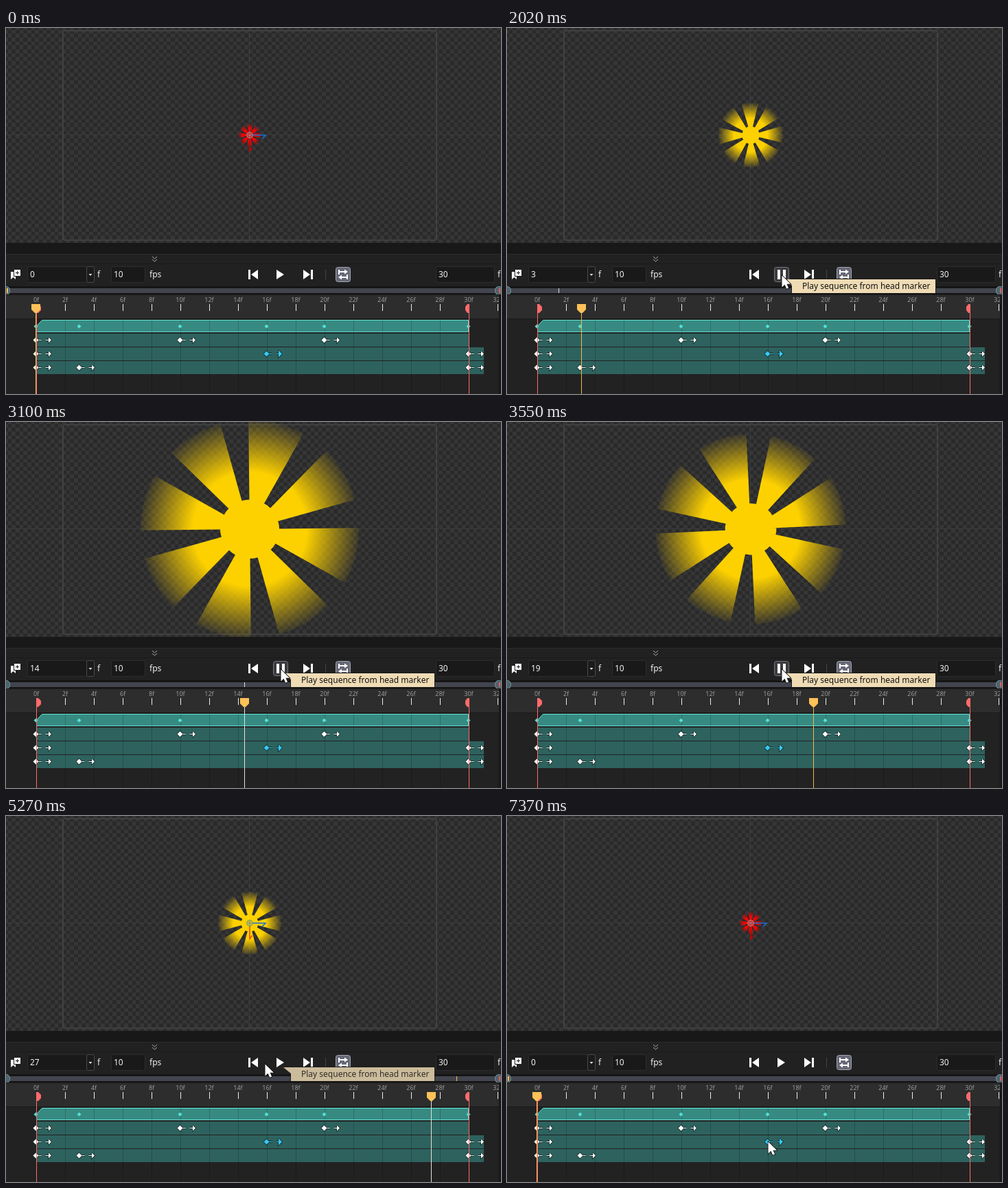
These frames come from a looping animation (721 by 533 pixels, 8000 ms). An HTML page with a canvas:

```html
<!DOCTYPE html>
<html>
<head>
<meta charset="utf-8">
<title>Timeline playback</title>
<style>
html, body { margin: 0; width: 100%; height: 100%; overflow: hidden; background: #222; }
canvas { display: block; }
</style>
</head>
<body>
<canvas id="stage" width="721" height="533"></canvas>
<script>
const c = document.getElementById('stage').getContext('2d');
const LOOP = 8000, PLAY = 1750, STOP = 4900, JUMP = 5910, STEP = 90;
const STOP_AT = 27.4;
const FONT = '"Noto Sans", sans-serif';
const BUTTONS = { back: 349, play: 389 };

const lerp = (a, b, u) => a + (b - a) * u;
const clamp = u => Math.max(0, Math.min(1, u));
const snap = (t, from) => from + STEP * Math.floor((t - from) / STEP);
const frameX = f => 44 + 21 * f;

function rect(x, y, w, h, fill) {
  c.fillStyle = fill;
  c.fillRect(x, y, w, h);
}
function box(x, y, w, h, fill, stroke, r = 2) {
  c.beginPath();
  c.roundRect(x + .5, y + .5, w - 1, h - 1, r);
  c.fillStyle = fill;
  c.fill();
  c.strokeStyle = stroke;
  c.lineWidth = 1;
  c.stroke();
}
function trace(points) {
  c.beginPath();
  points.forEach(([x, y], i) => i ? c.lineTo(x, y) : c.moveTo(x, y));
}
function poly(points, fill) {
  trace(points);
  c.closePath();
  c.fillStyle = fill;
  c.fill();
}
function line(points, stroke, width = 1) {
  trace(points);
  c.strokeStyle = stroke;
  c.lineWidth = width;
  c.stroke();
}
function text(s, x, y, size, fill, align = 'left') {
  c.font = size + 'px ' + FONT;
  c.textAlign = align;
  c.fillStyle = fill;
  c.fillText(s, x, y);
}
const diamond = (x, y, r) => [[x - r, y], [x, y - r], [x + r, y], [x, y + r]];

// Transparency grid, aligned with the corner of the scene frame.
const checker = (() => {
  const view = document.createElement('canvas');
  view.width = 721;
  view.height = 313;
  const g = view.getContext('2d');
  const edge = i => Math.round(2.8 + i * 5.65);
  g.fillStyle = '#363636';
  g.fillRect(0, 0, 721, 313);
  g.fillStyle = '#2a2a2a';
  for (let i = -1; edge(i) < 721; i++)
    for (let j = -1; edge(j) < 313; j++)
      if ((i + j) % 2 === 0) g.fillRect(edge(i), edge(j), edge(i + 1) - edge(i), edge(j + 1) - edge(j));
  return view;
})();

// Playback bounces back at the last frame.
function headAt(t) {
  if (t < PLAY || t >= JUMP) return 0;
  if (t >= STOP) return STOP_AT;
  const f = 3.05 + (snap(t, PLAY) - 2020) * .010546;
  return f > 30 ? 60 - f : f;
}

function cursorAt(t) {
  if (t < 750) return null;
  if (t < 5180) {
    const u = clamp((snap(t, 750) - 750) / 630), e = 1 - (1 - u) ** 2;
    return [lerp(316, 400, e), lerp(516, 360, e)];
  }
  if (t < 6470) {
    const k = Math.min(3, Math.floor((t - 5180) / STEP));
    return [[392, 377, 366, 360][k], 361];
  }
  if (t < 7280) {
    const u = clamp((snap(t, 6470) - 6380) / 810), v = 1 - u;
    return [v * v * 360 + 2 * u * v * 535 + u * u * 381,
            v * v * 361 + 2 * u * v * 420 + u * u * 476];
  }
  return [t < 7370 ? 381 : 380, 474];
}

function drawSun(f) {
  const size = f < 16 ? lerp(17, 174.5, f / 16) : lerp(174.5, 16.5, (f - 16) / 14);
  const turn = f < 10 ? 14.3 * f : f < 20 ? lerp(143, 360, (f - 10) / 10) : 0;
  const mix = clamp(f / 3), rad = Math.PI / 180;
  const tint = a => `rgba(${lerp(255, 253, mix)},${Math.round(209 * mix)},0,${a})`;
  const g = c.createRadialGradient(0, 0, 0, 0, 0, size);
  g.addColorStop(0, tint(1));
  g.addColorStop(.52, tint(1));
  g.addColorStop(1, tint(.06));
  c.save();
  c.translate(355, 156);
  c.rotate(turn * rad);
  c.beginPath();
  for (let i = 0; i < 8; i++) {
    c.moveTo(0, 0);
    c.arc(0, 0, size, (i * 45 - 15) * rad, (i * 45 + 15) * rad);
    c.closePath();
  }
  c.moveTo(size * .27, 0);
  c.arc(0, 0, size * .27, 0, 7);
  c.fillStyle = g;
  c.fill();
  c.restore();
}

function drawGizmo(f) {
  line([[359, 156], [378, 156], [373, 161]], '#1a6fd0', 1.6);
  line([[355, 160], [355, 179], [358.5, 174]], f ? '#f04a10' : '#d00000', 1.6);
  c.beginPath();
  c.arc(355, 156, 4.3, 0, 7);
  c.fillStyle = 'rgba(120,140,150,.35)';
  c.fill();
  c.strokeStyle = f ? '#5b9a78' : '#b09090';
  c.lineWidth = 1;
  c.stroke();
  line([[352.5, 156], [357.5, 156]], '#888');
  line([[355, 153.5], [355, 158.5]], '#888');
}

function drawView(f, playing) {
  c.save();
  c.beginPath();
  c.rect(0, 0, 721, 313);
  c.clip();
  c.drawImage(checker, 0, 0);
  rect(0, 155, 721, 1, 'rgba(85,85,85,.3)');
  rect(354, 0, 1, 313, 'rgba(65,80,100,.4)');
  c.beginPath();
  c.roundRect(83, 4, 544, 305, 2);
  c.strokeStyle = '#464646';
  c.lineWidth = 1.6;
  c.stroke();
  drawSun(f);
  if (!playing) drawGizmo(f);
  c.restore();
}

function drawTransport(f, playing, hover, pressed) {
  rect(0, 313, 721, 16, '#181818');
  rect(0, 329, 721, 47, '#212121');
  rect(0, 329, 721, 1, '#2c2c2c');
  rect(0, 343, 721, 1, '#1a1a1a');
  for (const y of [333, 337]) line([[213, y], [216.5, y + 3], [220, y]], '#aaa');

  const white = '#fff';
  rect(12, 352, 9, 9, white);
  rect(16, 354, 1, 5, '#222');
  rect(14, 356, 5, 1, '#222');
  poly([[7, 355], [11, 355], [11, 362], [14, 362], [14, 366], [10.5, 363], [7, 366]], white);

  box(31, 347, 87, 24, '#191919', '#2d2d2d');
  box(117, 347, 12, 24, '#1b1b1b', '#4a4a4a');
  poly([[120.5, 358], [125.5, 358], [123, 361]], '#ddd');
  box(153, 347, 50, 24, '#191919', '#2d2d2d');
  box(626, 347, 86, 24, '#191919', '#2d2d2d');
  [[Math.floor(f), 35], ['f', 133], ['10', 157], ['fps', 209], ['30', 630], ['f', 716]]
    .forEach(([s, x]) => text(s, x, 363, 12, '#f0f0f0'));

  if (hover) box(BUTTONS[hover], 348, 22, 22, pressed ? '#55555f' : '#3a3a3f', '#77777f', 3);
  rect(353, 352, 3, 14, white);
  poly([[367, 352], [367, 366], [357, 359]], white);
  if (playing) {
    rect(394, 352, 4, 14, white);
    rect(402, 352, 4, 14, white);
  } else poly([[394, 352], [405, 359], [394, 366]], white);
  poly([[433, 352], [443, 359], [433, 366]], white);
  rect(444, 352, 3, 14, white);
  rect(465, 352, 1, 14, '#444');

  box(480, 348, 22, 22, '#666876', '#a3a5b2', 3);
  rect(484, 352, 2, 7, white);
  rect(486, 354, 8, 2, white);
  poly([[493, 351.5], [498, 355], [493, 358.5]], white);
  rect(496, 359, 2, 7, white);
  rect(488, 362, 8, 2, white);
  poly([[489, 359.5], [484, 363], [489, 366.5]], white);
}

function drawScroll(f, playing) {
  rect(0, 376, 721, 12, '#151515');
  box(0, 378, 719, 9, '#42454e', '#151515', 3);
  box(-5, 376, 11, 13, '#4c646d', '#78929b', 5);
  box(712, 376, 12, 13, '#4c646d', '#78929b', 5);
  rect(718, 379, 2, 7, '#e85c5c');
  rect(Math.round(2 + 23.87 * f) - (f ? 0 : 1), 379, f ? 1 : 2, 7, playing ? '#ddd' : '#f6bd50');
}

// Shapes sit on a dark outline.
function drawKey(f, y, lit) {
  const x = frameX(f) - .5, ink = lit ? '#35c8f4' : '#fff', dark = '#142c2a';
  const r = lit ? 5 : 4, tip = x + 22.5;
  const head = [[tip - r, y - r], [tip, y], [tip - r, y + r]];
  const stem = [[x + 14, y], [tip - 3, y]], tail = [[x + 4, y], [x + 8, y]];
  for (const shape of [head, diamond(x, y, 4)]) line([...shape, shape[0]], dark, 1.6);
  line(stem, dark, 3);
  line(tail, dark, 3);
  poly(head, ink);
  poly(diamond(x, y, 4), ink);
  line(stem, ink, 1);
  line(tail, ink, 1);
}

function drawTracks() {
  rect(0, 388, 721, 35, '#2d2d2d');
  rect(0, 388, 721, 1, '#1b1b1b');
  rect(0, 423, 721, 110, '#222');
  rect(0, 423, 721, 1, '#191919');
  for (let i = 0; i <= 32; i += 2) {
    text(i + 'f', frameX(i), 399, 9, '#9a9a9a', 'center');
    rect(frameX(i), 402, 1, 10, '#eee');
  }

  rect(44, 445, 630, 19, '#2e625e');
  rect(44, 465, 652, 19, '#2e625e');
  rect(44, 485, 652, 19, '#2e625e');
  const bar = [[44.5, 442.5], [44.5, 434], [52.5, 425.5], [673.5, 425.5], [673.5, 442.5]];
  poly(bar, '#378a82');
  for (let i = 2; i <= 32; i += 2) rect(frameX(i), 424, 1, 109, 'rgba(0,0,0,.2)');
  line([...bar, bar[0]], '#5fe0d2');
  rect(718, 389, 3, 144, '#181818');

  for (const i of [0, 3, 10, 16, 20, 30]) poly(diamond(frameX(i) - .5, 434.5, 3), '#52e2d6');
  [[0, 10, 20], [0, 16, 30], [0, 3, 30]].forEach((keys, row) =>
    keys.forEach(k => drawKey(k, 454.5 + 20 * row, k === 16)));
}

function drawMarkers(f) {
  const red = '#ff6b6b';
  rect(44, 402, 1, 131, red);
  rect(674, 402, 1, 131, red);
  poly([[44, 402], [47, 402], [51, 406], [51, 411], [47, 415], [44, 415]], red);
  poly([[675, 402], [672, 402], [669, 406], [669, 411], [672, 415], [675, 415]], red);
  const x = f ? Math.floor(frameX(f)) : 43;
  rect(x, 412, 1, 121, !f || x % 2 === 0 ? '#f2b74e' : '#e6e1d8');
  poly([[x - 6, 402], [x + 7, 402], [x + 7, 410], [x + 2, 415], [x - 1, 415], [x - 6, 410]], '#fdc158');
}

function drawTip(t) {
  if (t < 1840 || t >= 5450) return;
  c.globalAlpha = t < 5270 ? 1 : t < 5360 ? .83 : .4;
  rect(414, 365, 211, 22, '#1a1a1a');
  rect(415, 366, 209, 20, '#efdcb5');
  poly([[404, 366], [415, 366], [415, 375]], '#efdcb5');
  text('Play sequence from head marker', 430, 380, 12, '#111');
  c.globalAlpha = 1;
}

function drawCursor([x, y]) {
  const shape = [[0, 0], [0, 17], [4, 13.3], [6.7, 19.3], [9.6, 18], [7, 12.3], [12.5, 12.3]];
  trace(shape.map(([a, b]) => [x + a + .5, y + b + .5]));
  c.closePath();
  c.strokeStyle = '#111';
  c.lineWidth = 1.6;
  c.stroke();
  c.fillStyle = '#fff';
  c.fill();
}

function draw(t) {
  const f = headAt(t), cursor = cursorAt(t);
  const playing = t >= PLAY && t < STOP;
  const over = name => cursor && cursor[1] >= 348 && cursor[1] < 370 &&
    cursor[0] >= BUTTONS[name] && cursor[0] < BUTTONS[name] + 22;
  const hover = Object.keys(BUTTONS).find(over);
  drawView(f, playing);
  drawTransport(f, playing, hover, t >= 5820 && t < 6000);
  drawScroll(f, playing);
  drawTracks();
  drawMarkers(f);
  drawTip(t);
  if (cursor) drawCursor(cursor);
}

const start = performance.now();
function tick() {
  draw((performance.now() - start) % LOOP);
  requestAnimationFrame(tick);
}
tick();
</script>
</body>
</html>
```
